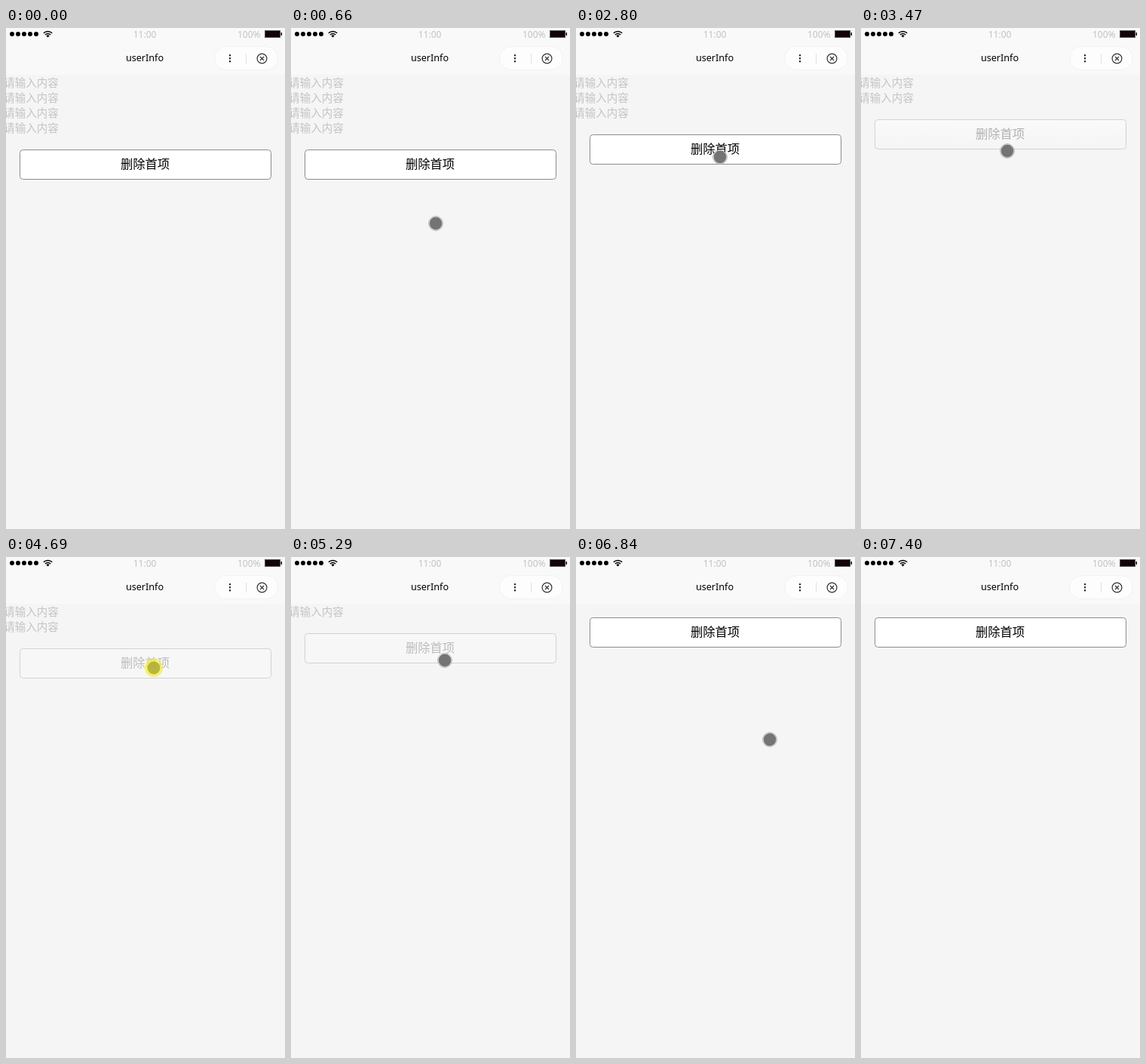
Write an HTML page that moves like this. It is 370 px wide and 664 px high and loops after 8.06 s.

```html
<!DOCTYPE html>
<html lang="zh">
<meta charset="utf-8">
<style>
  html, body { margin: 0; width: 100%; height: 100%; overflow: hidden; background: #f5f5f5 }
  svg { display: block }
  text { font-family: "Noto Sans", "Open Sans", "Noto Sans CJK SC", "Noto Sans CJK", sans-serif }
  .zh { font-family: "Noto Sans CJK SC", "Noto Sans CJK", sans-serif }
  .status { font-size: 12px; fill: #c2c2c2 }
  #rows { font-size: 14.5px; fill: #c4c4c4 }
  #label { font-size: 16.3px; text-anchor: middle }
</style>
<svg width="370" height="664" viewBox="0 0 370 664">
  <defs>
    <linearGradient id="fading" x2="0" y2="1">
      <stop stop-color="#fafafa"/><stop offset="1" stop-color="#f5f5f5"/>
    </linearGradient>
  </defs>
  <rect width="370" height="664" fill="#f5f5f5"/>
  <rect width="370" height="62" fill="#f9f9f9"/>

  <path d="M8 8h33" stroke="#000" stroke-width="6" stroke-linecap="round" stroke-dasharray="0 8"/>
  <g fill="none" stroke="#000" stroke-width="1.5">
    <path d="M49.8 6.8a8 8 0 0 1 11.4 0M51.9 9a5.1 5.1 0 0 1 7.2 0"/>
    <path d="M53.4 10.4a3 3 0 0 1 4.2 0L55.5 12.6z" fill="#000" stroke="none"/>
  </g>
  <text class="status" x="168.7" y="12.7">11:00</text>
  <text class="status" x="307" y="12.7">100%</text>
  <rect x="343.5" y="3.5" width="20" height="9" fill="#120408" stroke="#555"/>
  <rect x="364.5" y="6" width="1.5" height="4" fill="#120408"/>

  <text x="184" y="44" font-size="12.6" text-anchor="middle">userInfo</text>
  <rect x="276.5" y="24.5" width="84" height="31" rx="15.5" fill="#fdfdfd" stroke="#f2f2f2"/>
  <path d="M297 36.2v8.2" stroke="#222" stroke-width="2.4" stroke-linecap="round" stroke-dasharray="0 4"/>
  <path d="M318.5 34v13" stroke="#e0e0e0"/>
  <g fill="none" stroke="#333" stroke-width="1.2">
    <circle cx="339.5" cy="40.5" r="6.4"/>
    <path d="M337 38l5 5m0-5l-5 5"/>
  </g>

  <g id="rows" class="zh"></g>
  <g id="button">
    <rect id="box" x="18.5" y=".5" width="333" height="39" rx="4"/>
    <text id="label" class="zh" x="184.5" y="25.2">删除首项</text>
  </g>
  <g id="cursor">
    <circle id="glow" r="12" fill="#f5ee3c" fill-opacity=".75"/>
    <circle id="ring" r="9.4" fill="#fff" fill-opacity=".8" stroke="#999" stroke-width=".8"/>
    <circle id="dot" r="8.4"/>
  </g>
</svg>
<script>
const LOOP = 8060, STEP = 70;
const $ = id => document.getElementById(id);
const show = (id, on) => $(id).style.display = on ? '' : 'none';
const within = (t, [a, b]) => t >= a && t < b;

const presses = [[1940, 2070], [3330, 3400], [4690, 4820], [6220, 6290]];
const removals = [2270, 3470, 4890, 6360];
// small cursor moves: start, steps, target x, target y
const moves = [[1540, 1, 190, 175], [2740, 3, 194, 163], [4000, 4, 196, 147],
               [5150, 4, 207, 133], [5690, 1, 207, 132]];

for (let i = 0; i < 4; i++)
  $('rows').innerHTML += `<text x="-2.7" y="${78.3 + 20 * i}">请输入内容</text>`;

function cursorAt(t) {
  if (t < 240 || t >= 7400) return null;
  if (t < 1540) {
    const left = 1 - Math.min(Math.floor((t - 240) / STEP) / 10, 1);
    return [187.5 + 142.5 * left ** 3.8, 173 + 469 * left ** 1.85];
  }
  if (t >= 6630) {
    const u = (Math.floor((t - 6630) / STEP + .01) + 1) / 11;
    const v = Math.min(u, 1) ** 1.5;
    return [207 + 120 * (1 - (1 - v) ** 2.2), 132 + 502 * v];
  }
  let x = 188, y = 173;
  for (const [start, n, tx, ty] of moves) {
    if (t < start) break;
    const k = Math.min((Math.floor((t - start) / 66) + 1) / n, 1);
    x += (tx - x) * k;
    y += (ty - y) * k;
  }
  return [x, y];
}

function draw(t) {
  const count = 4 - removals.filter(r => t >= r).length;
  [...$('rows').children].forEach((row, i) => row.style.display = i < count ? '' : 'none');
  $('button').setAttribute('transform', `translate(0 ${Math.round(80.3 + 20.2 * count)})`);

  const faded = within(t, [3470, 6360]), fading = within(t, [3470, 3540]);
  $('box').setAttribute('fill', fading ? 'url(#fading)' : faded ? '#f7f7f7' : '#fff');
  $('box').setAttribute('stroke', faded ? '#d2d2d2' : '#8c8c8c');
  $('label').setAttribute('fill', fading ? '#b0b0b0' : faded ? '#bcbcbc' : '#000');

  const pos = cursorAt(t), pressed = presses.some(p => within(t, p));
  show('cursor', pos);
  if (!pos) return;
  $('cursor').setAttribute('transform', `translate(${pos.map(Math.round)})`);
  show('glow', pressed);
  show('ring', !pressed);
  $('dot').setAttribute('fill', pressed ? '#8f8f20' : '#686868');
  $('dot').setAttribute('fill-opacity', pressed ? .6 : .92);
}

const begin = performance.now();
function frame() {
  draw((performance.now() - begin) % LOOP);
  requestAnimationFrame(frame);
}
frame();
</script>
</html>
```
